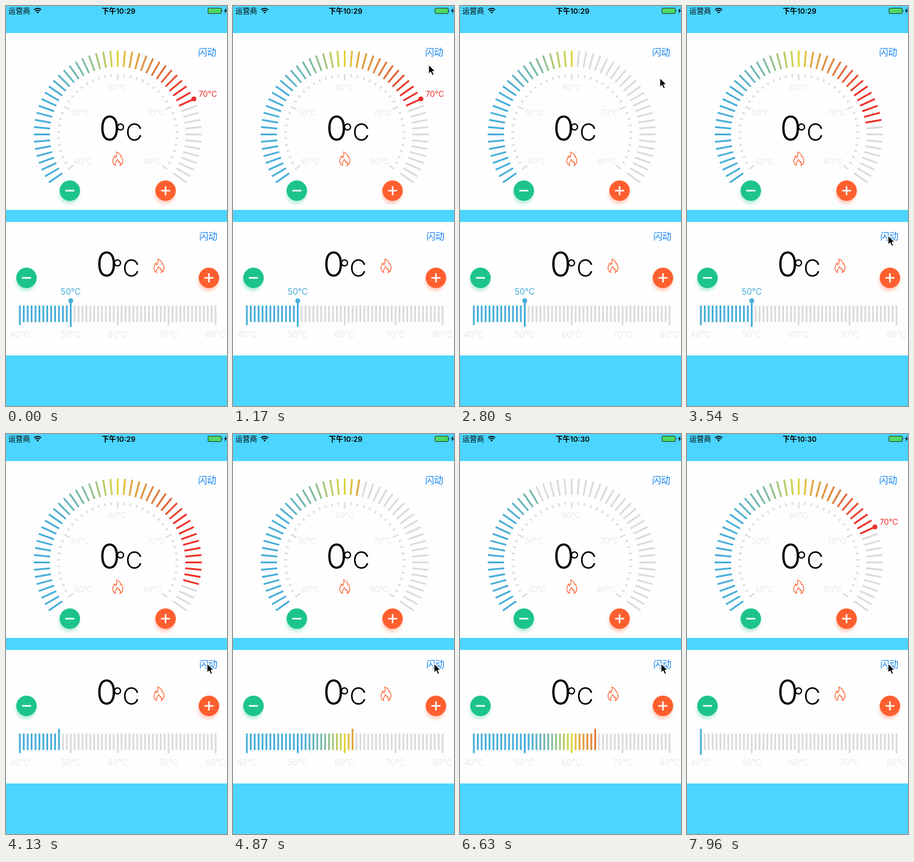
Recreate the animation shown at these times as an HTML page. Size 367 by 665 pixels, loop 8 s.

```html
<!DOCTYPE html>
<html lang="zh-CN">
<head>
<meta charset="utf-8">
<title>Temperature gauges</title>
<style>
  html, body { margin: 0; width: 100%; height: 100%; overflow: hidden; background: #4bd5ff; }
  svg { display: block; width: 367px; height: 665px; }
  text { font-family: Inter, Roboto, "Noto Sans CJK SC", "Noto Sans CJK", sans-serif; }
  .mid { text-anchor: middle; }
  .scale { fill: #d6d6d6; font-weight: 200; }
  .link { fill: #0f80f0; font-size: 15px; }
  .big { font-weight: 300; }
  .tick { stroke-width: 3; }
  .green { fill: #1dc48a; filter: drop-shadow(-1px 5px 2.5px rgba(29, 196, 138, .28)); }
  .orange { fill: #ff5f2f; filter: drop-shadow(-1px 5px 2.5px rgba(255, 95, 47, .28)); }
</style>
</head>
<body>
<svg viewBox="0 0 367 665">
  <defs>
    <path id="flame" fill="none" stroke="#ff6637" stroke-width="1.3" stroke-linecap="round" stroke-linejoin="round"
      d="M-3.5 11.2C-7 9.5-8.7 6-8 2C-7.5-1-5.7-2.5-5.2-5C-4.8-3.5-4.2-2.3-3.2-1.8C-1-5-1-8.5-2-11.5C3.5-9.3 5-6 5.2-3.2L6-4C8.3-.5 9 3 8 6.3C7.2 9 5.5 10.5 3.5 11.2M-3.5 11.2C-6 7 -2 5.7-1 1.2C1.2 2.5 2 4 2 6L3 5C5.2 7.5 4.7 10 3.5 11.2"/>
    <g id="minus"><circle class="green" r="17"/><path d="M-7.5 0H7.5" stroke="#fff" stroke-width="2.6"/></g>
    <g id="plus"><circle class="orange" r="17"/><path d="M-7.5 0H7.5M0-7.5V7.5" stroke="#fff" stroke-width="2.6"/></g>
  </defs>
  <rect width="367" height="665" fill="#4bd5ff"/>
  <rect y="45" width="367" height="294" fill="#fefefe"/>
  <rect y="359" width="367" height="222" fill="#fefefe"/>

  <text x="4" y="12.5" font-size="12">运营商</text>
  <g fill="none" stroke="#000" stroke-width="1.8">
    <path d="M46.7 6.3A8.3 8.3 0 0 1 58.3 6.3M48.9 8.7A5.2 5.2 0 0 1 56.1 8.7"/>
    <path d="M52.5 12.4L50.6 10.4A2.7 2.7 0 0 1 54.4 10.4Z" fill="#000" stroke="none"/>
  </g>
  <text id="clock" class="mid" x="187" y="12.5" font-size="12" font-weight="600"></text>
  <rect x="335.5" y="3.5" width="22" height="9" rx="1.5" fill="#4cd964" stroke="#222" stroke-width=".9"/>
  <path d="M358.8 6.2Q360.4 8 358.8 9.8Z"/>
  <path d="M366 3L362 8.5H364.4L363 13L367 7.2H364.8Z"/>

  <text class="link" x="319" y="81.5">闪动</text>
  <text class="link" x="321" y="387.5">闪动</text>

  <g id="dial"></g>
  <g id="ruler"></g>

  <g id="reading" class="big">
    <text class="mid" x="172" y="223.5" font-size="57">0</text>
    <text x="227" y="223.5" font-size="39" text-anchor="end">°C</text>
  </g>
  <use href="#reading" x="-5" y="226"/>
  <use href="#flame" x="185.5" y="254"/>
  <use href="#flame" x="254" y="432"/>
  <use href="#minus" x="106" y="307"/>
  <use href="#plus" x="265" y="307"/>
  <use href="#minus" x="34" y="452"/>
  <use href="#plus" x="337" y="452"/>

  <g id="dialMark" fill="#ec2f28">
    <circle cx="312" cy="154.5" r="4"/>
    <text class="mid" x="335.3" y="151" font-size="13">70°C</text>
  </g>
  <g id="rulerMark" fill="#47aed9">
    <circle cx="107.5" cy="490" r="4"/>
    <text class="mid" x="107.5" y="480" font-size="14">50°C</text>
  </g>
  <path id="cursor" d="M0 0V14.5L3.4 11.4L6 17.2L8.6 16L6 10.4H10.6Z" stroke="#fff" stroke-width="1"/>
</svg>
<script>
const LOOP = 8000, FIRST_STEP = 586, STEP = 147.4;
const GRAY = '#dbdbdb', CX = 185.5, CY = 213.5;
const MAJOR = [0, 13, 25, 38, 50];
const $ = id => document.getElementById(id);

function add(parent, name, attrs, text = '') {
  const el = document.createElementNS('http://www.w3.org/2000/svg', name);
  for (const key in attrs) el.setAttribute(key, attrs[key]);
  el.textContent = text;
  return parent.appendChild(el);
}

// Linear interpolation through rows of [position, ...values].
function track(rows, x) {
  if (x <= rows[0][0]) return rows[0].slice(1);
  for (let i = 1; i < rows.length; i++) {
    const a = rows[i - 1], b = rows[i];
    if (x <= b[0]) {
      const f = (x - a[0]) / (b[0] - a[0]);
      return a.slice(1).map((v, j) => v + (b[j + 1] - v) * f);
    }
  }
  return rows[rows.length - 1].slice(1);
}

const HEAT = [[14, 72, 174, 217], [20, 128, 187, 160], [25, 223, 214, 63],
  [27, 224, 168, 64], [31, 223, 123, 59], [36, 237, 48, 40]];
const heat = Array.from({ length: 51 }, (_, i) => `rgb(${track(HEAT, i).map(Math.round)})`);

// Degrees run clockwise from the dial's lower left end.
function spoke(deg, inner, outer) {
  const a = (deg + 145) * Math.PI / 180, c = Math.cos(a), s = Math.sin(a);
  return { x1: CX + inner * c, y1: CY + inner * s, x2: CX + outer * c, y2: CY + outer * s };
}

const dialTicks = heat.map((_, i) =>
  add($('dial'), 'line', { class: 'tick', ...spoke(i * 5, 112.5, 139.5) }));
for (let i = 0; i <= 40; i++)
  add($('dial'), 'line', { stroke: GRAY, 'stroke-width': i % 10 ? 2.6 : 2.4, ...spoke(i * 6.25, i % 10 ? 96 : 90, 100.5) });
[[128, 262.5], [123, 182], [185.3, 140], [248.3, 182], [243, 262.5]].forEach(([x, y], i) =>
  add($('dial'), 'text', { class: 'mid scale', x, y, 'font-size': 13 }, `${40 + i * 10}°C`));

const rulerTicks = heat.map((_, i) =>
  add($('ruler'), 'line', { class: 'tick', x1: 23 + i * 6.5, x2: 23 + i * 6.5 }));
MAJOR.forEach((n, i) =>
  add($('ruler'), 'text', { class: 'mid scale', x: 23 + n * 6.5, y: 551, 'font-size': 14 }, `${40 + i * 10}°C`));

// Positions below are in steps.
const DIAL = [[7, -.6], [10, 9], [20, 41], [23, 50], [29, 27], [35, 4], [36, 0], [41, 19], [46, 35], [47, 38]];
const RULER = [[21, 0], [22, 3], [29, 27], [35, 48], [35.57, 50], [41, 31], [50, 0]];
const POINTER = [[0, 349, 190], [2, 334, 128], [3, 325, 98], [5, 331, 77], [14, 331, 77],
  [15, 332, 120], [17, 336, 310], [18, 334, 365], [19, 334, 382]];

function draw(time) {
  const step = Math.floor((time % LOOP - FIRST_STEP) / STEP);
  const dialRests = step < 7 || step >= 47, rulerRests = step < 21;
  const dial = dialRests ? 38 : Math.round(track(DIAL, step)[0]);
  const ruler = rulerRests ? 13 : Math.round(track(RULER, step)[0]);

  dialTicks.forEach((el, i) => el.setAttribute('stroke', i <= dial ? heat[i] : GRAY));
  rulerTicks.forEach((el, i) => {
    const tip = i === ruler, major = MAJOR.includes(i);
    el.setAttribute('stroke', i <= ruler ? heat[i] : GRAY);
    el.setAttribute('y1', tip ? 490 : 498);
    el.setAttribute('y2', major ? (tip ? 533.5 : 530.5) : 525.5);
  });

  $('dialMark').style.display = dialRests ? '' : 'none';
  $('rulerMark').style.display = rulerRests ? '' : 'none';
  $('cursor').style.display = step < 0 ? 'none' : '';
  $('cursor').setAttribute('transform', `translate(${track(POINTER, step)})`);
  $('clock').textContent = step < 40 ? '下午10:29' : '下午10:30';
}

const start = performance.now();
function tick() {
  draw(performance.now() - start);
  requestAnimationFrame(tick);
}
tick();
</script>
</body>
</html>
```
